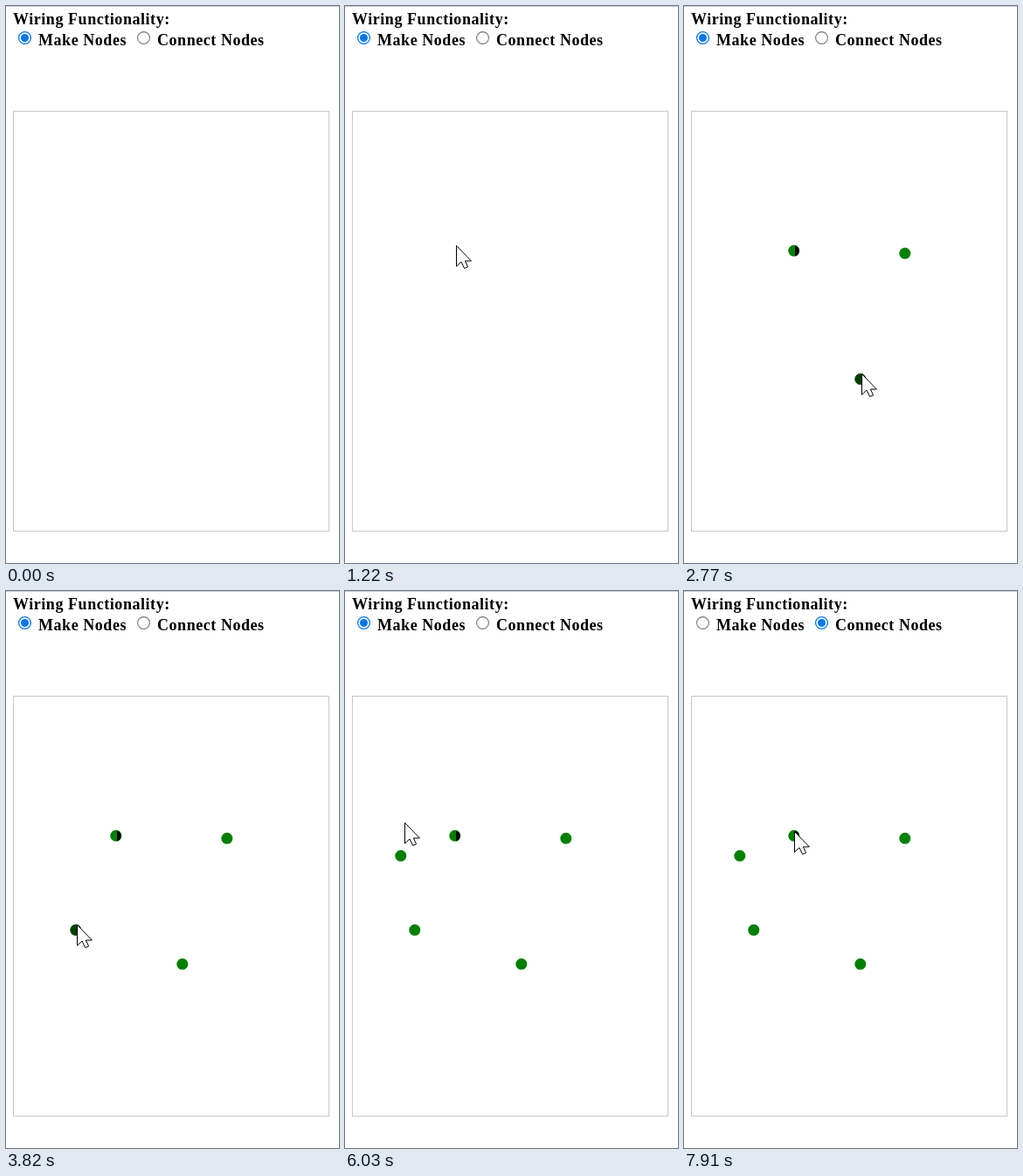
These frames come from a looping animation (381x638 px, 8000 ms). An HTML page:

```html
<!DOCTYPE html>
<html lang="en">
<head>
<meta charset="utf-8">
<title>Wiring</title>
<style>
  html, body { margin: 0; width: 100%; height: 100%; overflow: hidden; background: #fff; }
  svg { display: block; width: 381px; height: 638px; }
  text { font: bold 18px "Liberation Serif", "Times New Roman", serif; letter-spacing: .55px; }
</style>
</head>
<body>
<svg viewBox="0 0 381 638">
  <path d="M0 .5H381" stroke="#c8c8c8"/>
  <text x="8" y="21">Wiring Functionality:</text>
  <text x="37" y="45">Make Nodes</text>
  <text x="173" y="45">Connect Nodes</text>
  <g id="radios"></g>
  <rect x="8.5" y="120.5" width="361" height="481" fill="none" stroke="#c8c8c8"/>
  <g id="nodes"></g>
  <path id="half" d="M127 274.2A6.5 6.5 0 0 1 127 286.6Z"/>
  <circle id="ring" r="18" fill="#ff0" fill-opacity=".47"/>
  <path id="cursor" d="M.5 .5V24.2L6 19L9.6 26.5L13.6 24.9L10.4 18H17.4Z" fill="#fff" stroke="#000"/>
</svg>
<script>
const LOOP = 8000, CLICK = 110, LEAD = 35;
const $ = id => document.getElementById(id);

// The cursor travels to each stop from leave to arrive, bending towards via, then clicks.
const stops = [
  { at: [127, 274], leave: 110, arrive: 770, click: 1090 },
  { at: [254, 277], leave: 1240, arrive: 1900, click: 2085 },
  { at: [203, 421], leave: 2440, arrive: 2770, click: 3020, via: [248, 390] },
  { at: [81, 382], leave: 3310, arrive: 3820, click: 4190 },
  { at: [72, 300], leave: 4910, arrive: 5080, via: [51, 325] },
  { at: [65, 297], leave: 5370, arrive: 5460, click: 5620 },
  { at: [159, 29], leave: 6030, arrive: 6780, click: 6770, via: [78, 113] },
  { at: [126, 275], leave: 7160, arrive: 7910, via: [95, 190] }
];
const entry = [316, 594];
const connectAt = 6880;

function add(parent, attrs) {
  const c = document.createElementNS('http://www.w3.org/2000/svg', 'circle');
  for (const k in attrs) c.setAttribute(k, attrs[k]);
  return parent.appendChild(c);
}

const show = (el, on) => el.setAttribute('visibility', on ? 'visible' : 'hidden');
const mix = (a, b, k) => a.map((v, i) => v + (b[i] - v) * k);

// Every click inside the board leaves a node, dark until the cursor moves on.
const nodes = stops.filter(s => s.click && s.at[1] > 120).map((s, i) => {
  const left = stops[stops.indexOf(s) + 1].leave;
  return {
    born: i ? s.arrive : left,
    left,
    dot: add($('nodes'), { cx: s.at[0] - 1.2, cy: s.at[1] + 6.3, r: 6.5 }),
  };
});

const radios = [21.5, 157.5].map(cx => ({
  rim: add($('radios'), { cx, cy: 36.5, r: 6.9, fill: '#fff' }),
  dot: add($('radios'), { cx, cy: 36.5, r: 4.5 })
}));

function cursorAt(t) {
  const i = stops.filter(s => t >= s.leave).length - 1;
  if (i < 0) return null;
  const { at, leave, arrive, via } = stops[i];
  const from = i ? stops[i - 1].at : entry;
  const u = Math.min(1, (t - leave + LEAD) / (arrive - leave + LEAD));
  const k = 1 - (1 - u) ** 2;
  const p = via ? mix(mix(from, via, k), mix(via, at, k), k) : mix(from, at, k);
  return p.map(Math.round);
}

function setRadio({ rim, dot }, on, hover) {
  const blue = hover ? '#0b5cc8' : '#0577ea';
  rim.setAttribute('stroke', on ? blue : hover ? '#4f4f4f' : '#767676');
  rim.setAttribute('stroke-width', on ? 1.3 : 1.1);
  dot.setAttribute('fill', blue);
  show(dot, on);
}

function draw(now) {
  const t = now % LOOP;
  const p = cursorAt(t);
  show($('cursor'), p);
  show($('ring'), stops.some(s => t >= s.click && t < s.click + CLICK));
  if (p) {
    $('cursor').setAttribute('transform', `translate(${p})`);
    $('ring').setAttribute('transform', `translate(${p})`);
  }
  for (const { born, left, dot } of nodes) {
    show(dot, t >= born);
    dot.setAttribute('fill', t < left ? '#004000' : '#008000');
  }
  show($('half'), t >= nodes[0].born);
  setRadio(radios[0], t < connectAt, false);
  setRadio(radios[1], t >= connectAt, t >= 6780 && t < 7190);
  requestAnimationFrame(draw);
}
draw(0);
</script>
</body>
</html>
```
